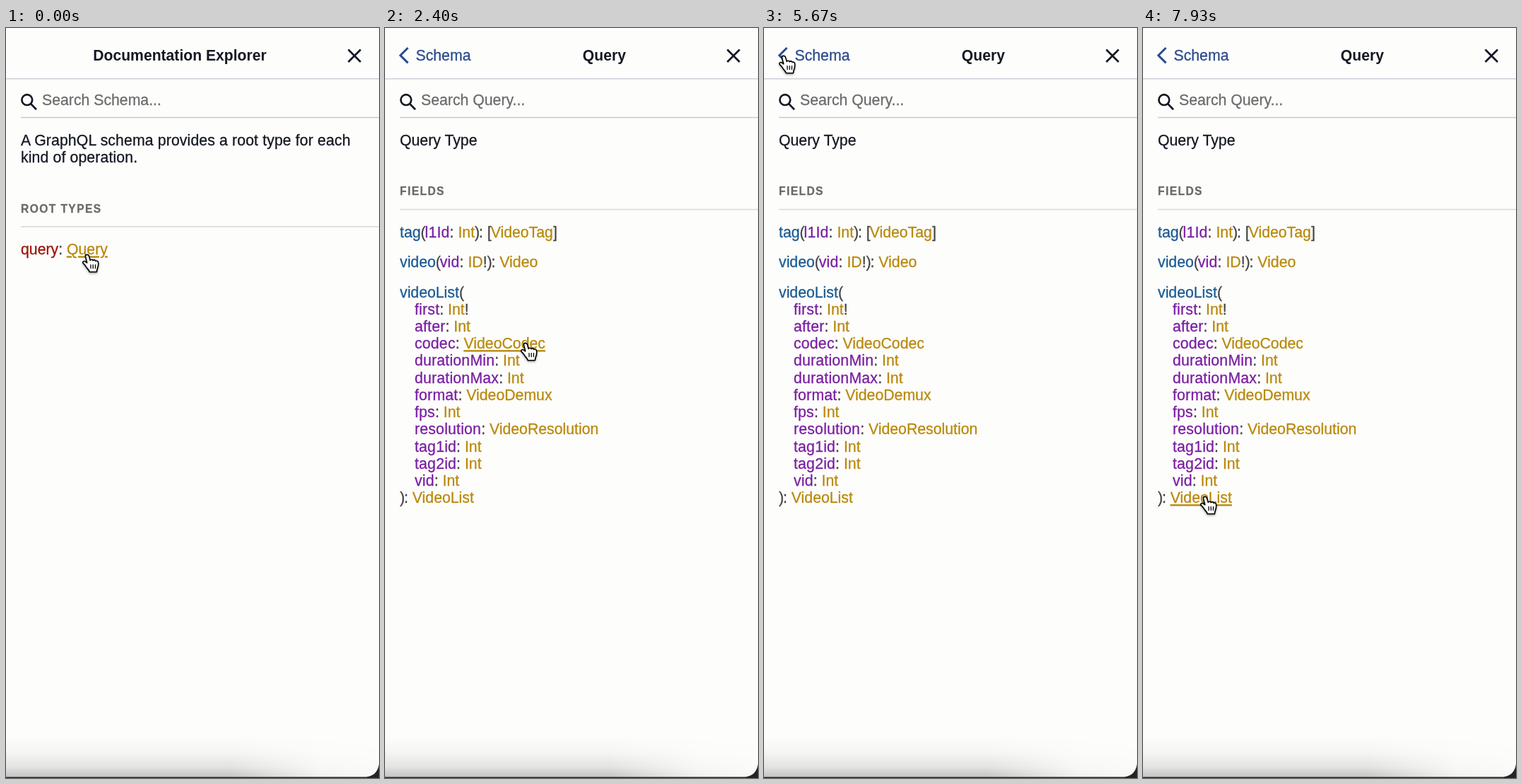
An HTML page for the animation above (8 s loop, 528 px wide and 1060 px high).

```html
<!DOCTYPE html>
<html lang="en">
<head>
<meta charset="utf-8">
<title>Documentation Explorer</title>
<style>
  html, body { margin: 0; width: 100%; height: 100%; overflow: hidden; background: #fdfdfc; }
  svg { display: block; }
  text { font: 21.25px "Liberation Sans", Arial, sans-serif; color: #141823; }
  text, tspan { fill: currentColor; stroke: currentColor; stroke-width: .3px; }
  .title { font-size: 21.15px; font-weight: 700; text-anchor: middle; stroke: none; }
  .head { font-size: 15.58px; font-weight: 700; letter-spacing: 1.417px; color: #6a6a6a; }
  .hint { color: #6c6c6c; }
  .prose { letter-spacing: .12px; }
  .code, .desc { color: #444; }
  .back { color: #2b4c8c; }
  .key { color: #9c1408; }
  .type { color: #b8890b; }
  .field { color: #1a5a94; }
  .arg { color: #7a1fa2; letter-spacing: .2px; }
  .bracket { letter-spacing: -1.1px; }
  .value { color: #0b6fb8; }
  .hover { text-decoration: underline; }
  .rule { stroke-width: 1.4; }
  .icon { fill: none; stroke: #141823; stroke-width: 2.7; }
  .page { visibility: hidden; }
  .page.on { visibility: visible; }
</style>
</head>
<body>
<svg width="528" height="1060" viewBox="0 0 528 1060">
  <defs>
    <linearGradient id="rise" x1="0" y1="0" x2="0" y2="1">
      <stop offset="0" stop-color="#000" stop-opacity="0"/>
      <stop offset=".4" stop-color="#000" stop-opacity=".03"/>
      <stop offset=".75" stop-color="#000" stop-opacity=".1"/>
      <stop offset="1" stop-color="#000" stop-opacity=".22"/>
    </linearGradient>
    <linearGradient id="side">
      <stop offset="0" stop-color="#fff"/>
      <stop offset=".6" stop-color="#fff"/>
      <stop offset=".84" stop-color="#fff" stop-opacity=".2"/>
      <stop offset="1" stop-color="#fff" stop-opacity=".08"/>
    </linearGradient>
    <mask id="fade"><rect y="990" width="528" height="70" fill="url(#side)"/></mask>
    <filter id="soft" x="-50%" y="-50%" width="200%" height="200%">
      <feDropShadow dx="0" dy="1.5" stdDeviation="1.4" flood-opacity=".35"/>
    </filter>
  </defs>

  <rect y="1030" width="528" height="30" fill="#222522"/>
  <path d="M0 0H528V1040Q526 1056.5 510 1058.5H0Z" fill="#fdfdfc"/>
  <path d="M0 1000H528V1040Q526 1056.5 510 1058.5H0Z" fill="url(#rise)" mask="url(#fade)"/>

  <path class="rule" d="M0 71.7H528" stroke="#cfcfd8"/>
  <path class="icon" d="M484.5 30.5L502 48M502 30.5L484.5 48"/>

  <g id="pages"></g>

  <g id="cursor" filter="url(#soft)">
    <path id="arrow" d="M0 0V19.2L4.5 15L7.7 22.6L11.1 21.1L7.9 13.7H13.8Z"
          fill="#000" stroke="#fff" stroke-width="1.5" stroke-linejoin="round"/>
    <g id="hand" transform="translate(-1 2.4)" stroke="#000" stroke-linejoin="round" stroke-linecap="round">
      <path d="M-2.6 2.2C-2.8-.5 1.3-.9 2.3 1.6L4.3 8C4.7 6.6 7.6 6.4 8.2 8.3C9 7 11.4 7.2 12 9.1
               C13 8.2 15.3 8.6 15.6 11C16 14 15.6 16.5 14.6 19C13.8 21 13.4 22 13.4 24.3H3.2
               C3 22.5 1 20.5-1 18C-2.6 15.5-3.8 14-5.6 12.3C-7.2 10.4-4.8 8.2-2.8 9.6L-.3 11.4Z"
            fill="#fff" stroke-width="1.6"/>
      <path d="M4.9 14.2L5.1 19.2M8.2 14.2L8.3 19.2M11.5 14.2L11.4 19.2" fill="none" stroke-width="1.3"/>
    </g>
  </g>
</svg>

<script>
const $ = id => document.getElementById(id);

const text = (x, y, cls, body) => `<text x="${x}" y="${y}" class="${cls}">${body}</text>`;
const span = (cls, body) => `<tspan class="${cls}">${body}</tspan>`;
const type = name => span('type link', name);
const field = name => span('field link', name);
const arg = (name, kind) => `${span('arg', name)}: ${type(kind)}`;
const open = span('bracket', '(');
const close = span('bracket', ')');
const rule = (y, color) => `<path class="rule" d="M21 ${y}H528" stroke="${color}"/>`;

const search = name =>
  '<circle class="icon" cx="29.8" cy="101.6" r="7.4"/><path class="icon" d="M35 107L43 115.2"/>' +
  text(51, 109.3, 'hint', `Search ${name}...`) + rule(126.5, '#c9c9ce');

const back = name =>
  '<path d="M32.5 28L21.8 38.7L32.5 49.4" fill="none" stroke="#2b4c8c" stroke-width="3"/>' +
  text(43.5, 46, 'back', name);

const section = (y, name) => text(21, y, 'head', name) + rule(y + 20.1, '#d9d9d2');

const args = [
  ['first', 'Int', '!'], ['after', 'Int'], ['codec', 'VideoCodec'],
  ['durationMin', 'Int'], ['durationMax', 'Int'], ['format', 'VideoDemux'],
  ['fps', 'Int'], ['resolution', 'VideoResolution'],
  ['tag1id', 'Int'], ['tag2id', 'Int'], ['vid', 'Int']
];
const codecs = [
  ['AV1', 'AV1 Codec'], ['AVC', 'H264 Codec'], ['H264', 'H264 Codec'],
  ['H265', 'H265 Codec'], ['H266', 'H266 Codec'], ['HEVC', 'H265 Codec'],
  ['VP8', 'VP8 Codec'], ['VP9', 'VP9 Codec'], ['VVC', 'H266']
];

const schemaPage =
  text(246, 46, 'title', 'Documentation Explorer') + search('Schema') +
  text(21, 165.5, 'prose', 'A GraphQL schema provides a root type for each') +
  text(21, 189.8, 'prose', 'kind of operation.') +
  section(260.6, 'ROOT TYPES') +
  text(21, 320.4, 'code', `${span('key', 'query')}: ${type('Query')}`);

const queryPage =
  back('Schema') + text(310.4, 46, 'title', 'Query') + search('Query') +
  text(21, 165.5, '', 'Query Type') + section(236.4, 'FIELDS') +
  text(21, 295.6, 'code',
    `${field('tag')}${open}${arg('l1Id', 'Int')}${close}: ${span('bracket', '[')}${type('VideoTag')}]`) +
  text(21, 338, 'code',
    `${field('video')}${open}${arg('vid', 'ID')}!${close}: ${type('Video')}`) +
  text(21, 380.5, 'code', field('videoList') + open) +
  args.map(([name, kind, end = ''], i) =>
    text(42, 404.8 + i * 24.22, 'code', arg(name, kind) + end)).join('') +
  text(21, 671.3, 'code', `${close}: ${type('VideoList')}`);

const codecPage =
  back('Query') + text(299.5, 46, 'title', 'VideoCodec') +
  text(21, 123, 'prose', 'Enum class: VideoCodec') + section(193.9, 'VALUES') +
  codecs.map(([name, note], i) =>
    text(21, 253 + i * 72.7, 'value', name) +
    text(21, 283.4 + i * 72.7, 'desc prose', note)).join('');

$('pages').innerHTML = [schemaPage, queryPage, codecPage]
  .map(body => `<g class="page">${body}</g>`).join('');
const pages = [...document.querySelectorAll('.page')];

const LOOP = 8000, STEP = 1000 / 15;

// [time, page]
const visits = [[0, 0], [470, 1], [2870, 2], [5330, 1]];

// [start, end, x, y] of each pointer move
const moves = [
  [0, 0, 116, 318],
  [1130, 1450, 138, 327],
  [1540, 2150, 200, 443],
  [4260, 5000, 29, 37],
  [5870, 6750, 77, 726],
  [7130, 7660, 89, 660]
];

const ease = p => p * p * (3 - 2 * p);

function pointerAt(t) {
  let x = 0, y = 0;
  for (const [start, end, toX, toY] of moves) {
    if (t < start) break;
    const p = t >= end ? 1 : ease((t - start) / (end - start));
    x += (toX - x) * p;
    y += (toY - y) * p;
  }
  return [x, y];
}

const inside = (r, x, y) => x >= r.left && x <= r.right && y >= r.top && y <= r.bottom;

function draw(t) {
  const shown = visits.filter(v => v[0] <= t).pop()[1];
  pages.forEach((page, i) => page.classList.toggle('on', i === shown));

  const [x, y] = pointerAt(t);
  let over = shown > 0 && x > 15 && x < 125 && y < 60;
  for (const link of pages[shown].querySelectorAll('.link')) {
    const hit = inside(link.getBoundingClientRect(), x, y);
    link.classList.toggle('hover', hit);
    over = over || hit;
  }
  $('cursor').setAttribute('transform', `translate(${x} ${y})`);
  $('hand').style.display = over ? '' : 'none';
  $('arrow').style.display = over ? 'none' : '';
}

const t0 = performance.now();
function tick() {
  const t = (performance.now() - t0) % LOOP;
  draw(Math.floor(t / STEP + 0.1) * STEP);
  requestAnimationFrame(tick);
}
tick();
</script>
</body>
</html>
```
